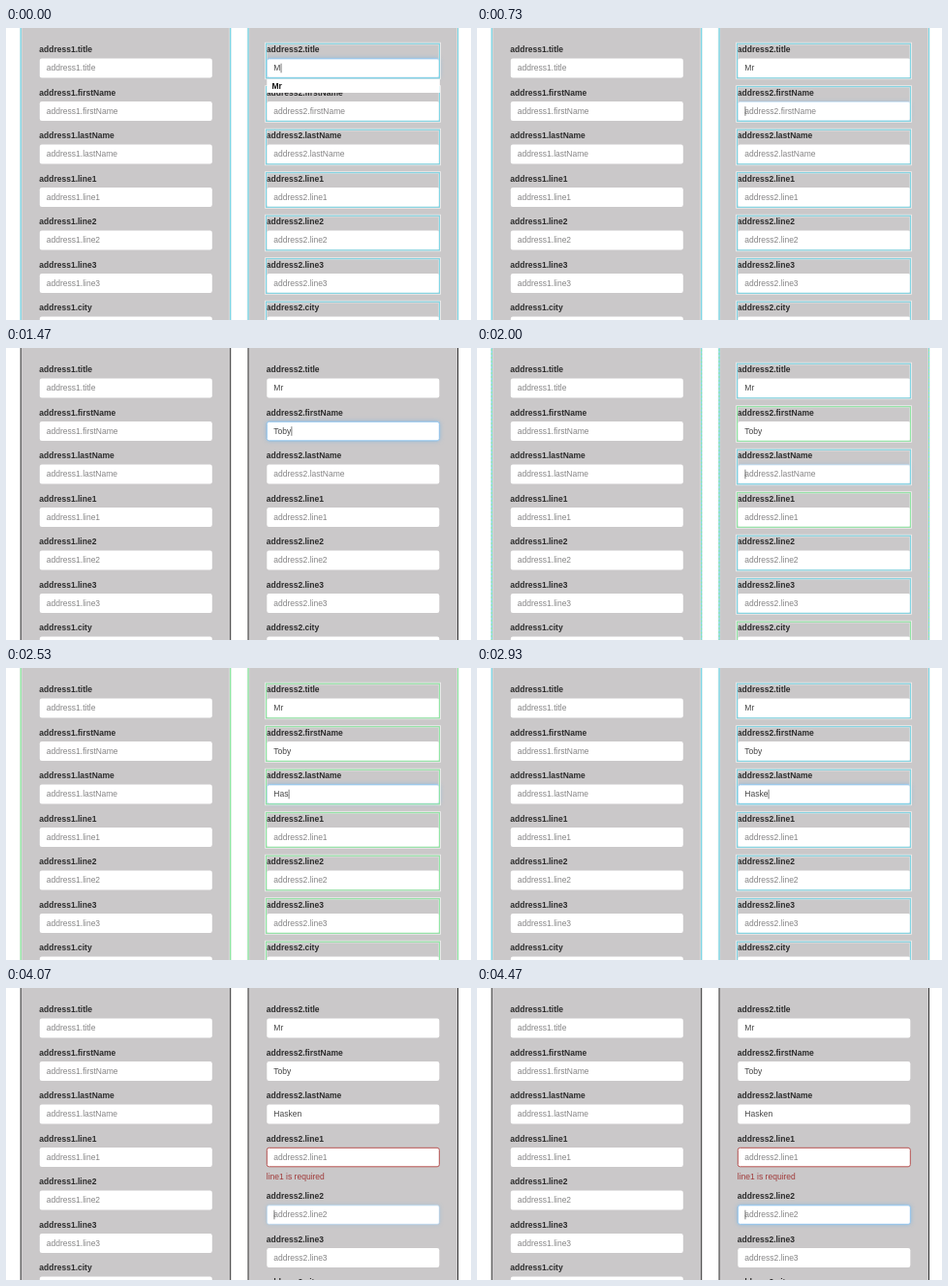
An HTML page for the animation above (4.54 s loop, 480 by 302 pixels).

```html
<!DOCTYPE html>
<html lang="en">
<head>
<meta charset="utf-8">
<title>Address form</title>
<style>
  html, body { margin: 0; width: 100%; height: 100%; overflow: hidden; background: #fff; }
  svg { display: block; width: 100%; height: 100%; }
  text { font: 8.5px "Liberation Sans", Arial, sans-serif; fill: #444; white-space: pre; }
  .label { font-weight: bold; fill: #2b2b2b; }
  .hint { fill: #858485; }
  .error { fill: #a03a3a; }
  .ring { fill: #fff; stroke: #7db9ea; stroke-width: .8; filter: drop-shadow(0 0 2px rgba(102, 175, 233, .6)); }
</style>
</head>
<body>
<svg id="stage" viewBox="0 0 480 302" preserveAspectRatio="none"></svg>
<script>
const LOOP = 4540, FPS = 15;
const NAMES = ['title', 'firstName', 'lastName', 'line1', 'line2', 'line3', 'city'];
const PITCH = 44.5, ERROR_SHIFT = 15, ERROR_TICK = 60, MENU_END = 7;
const PANELS = [15.2, 250];
const CYAN = '#78d6e6', GREEN = '#8be8a0', LIGHT = '#f0f0f0';

// All times below are ticks of 1/15 s.
const TYPED = {
  0: { text: 'Mr', at: [0, 2] },
  1: { text: 'Toby', at: [16, 17, 20, 21] },
  2: { text: 'Hasken', at: [34, 36, 38, 42, 44, 50] }
};
const FOCUS = [[-2, 0], [10, 1], [29, 2], [55, 3], [60, 4]];
const FLASH = [
  [0, 'cyan'], [3, 'green'], [4, 'cyan'], [5, ''],
  [7, 'cyan'], [10, ''], [11, 'cyan'], [14, ''],
  [16, 'cyan'], [18, 'green'], [22, ''],
  [28, 'cyan'], [30, 'mixed'], [31, 'green'], [32, ''],
  [34, 'cyan'], [36, 'green'], [41, ''],
  [42, 'cyan'], [45, 'green'], [49, ''],
  [50, 'cyan'], [54, ''], [55, 'cyan'], [59, ''],
  [62, 'cyan'], [64, 'green'], [67, '']
];
const MIXED_GREEN = [1, 3, 6];

const stage = document.getElementById('stage');
const pen = document.createElement('canvas').getContext('2d');
pen.font = '8.5px "Liberation Sans", Arial, sans-serif';

const latest = (list, tick) => list.filter(e => e[0] <= tick).pop();
const rect = (x, y, w, h, attrs) =>
  `<rect x="${x}" y="${y}" width="${w}" height="${h}" ${attrs}/>`;
const text = (x, y, cls, s) => `<text x="${x}" y="${y}" class="${cls}">${s}</text>`;

function valueAt(i, tick) {
  const typed = TYPED[i];
  return typed ? typed.text.slice(0, typed.at.filter(t => t <= tick).length) : '';
}

function panel(x, border) {
  return rect(x, -10, 216.5, 400, `fill="#cac8c9" stroke="${border}"`);
}

function field(x, y, name, value, ring, failed) {
  const top = y + 31.5;
  let out = text(x, y + 25, 'label', name) +
    rect(x + .5, top, 178, 20, 'rx="2.2" fill="#fff"');
  if (ring > 0) out += rect(x + .5, top + .3, 178, 19.5, `rx="2.2" class="ring" opacity="${ring}"`);
  if (failed) out += rect(x + .5, top + .3, 178, 19.5, 'rx="2.2" fill="none" stroke="#b5504f"');
  return out + text(x + 7.5, y + 44.4, value ? '' : 'hint', value || name);
}

function outline(x, y, w, h, color, dashed) {
  const line = (d, stroke, width, dash = '') =>
    rect(x - d, y - d, w + 2 * d, h + 2 * d,
      `fill="none" stroke="${stroke}" stroke-width="${width}" stroke-dasharray="${dash}"`);
  return line(1, LIGHT, .8) + line(-.9, LIGHT, .4) + line(0, color, 1) +
    (dashed ? line(0, GREEN, 1, '2 2') : '');
}

function draw(tick) {
  const [since, active] = latest(FOCUS, tick);
  const flash = latest(FLASH, tick)[1];
  const base = flash === 'green' ? GREEN : CYAN, mixed = flash === 'mixed';
  const failed = tick >= ERROR_TICK;
  const rowY = i => i * PITCH + (failed && i > 3 ? ERROR_SHIFT : 0);
  let out = PANELS.map(x => panel(x, flash ? base : '#333')).join('');

  NAMES.forEach((name, i) => {
    const value = valueAt(i, tick), y = rowY(i), bad = failed && i === 3;
    const ring = i === active ? Math.min(1, (tick - since) / 2) : 0;
    out += field(34.3, i * PITCH, 'address1.' + name, '', 0, false);
    out += field(268.8, y, 'address2.' + name, value, ring, bad);
    if (bad) out += text(268.8, y + 64, 'error', 'line1 is required');
    if (i === active) {
      const x = 276.6 + pen.measureText(value).width;
      out += rect(x, y + 36.7, .7, 9.6, 'fill="#444"');
    }
  });

  if (flash) {
    PANELS.forEach(x => { out += outline(x, -10, 216.5, 400, base, mixed); });
    NAMES.forEach((_, i) => {
      const color = mixed && MIXED_GREEN.includes(i) ? GREEN : base;
      const extra = failed && i === 3 ? ERROR_SHIFT : 0;
      out += outline(268.6, rowY(i) + 16.2, 178.8, 35.6 + extra, color, false);
    });
  }

  if (tick < MENU_END) {
    out += rect(269.3, 53, 178.5, 14, 'fill="#fff"') +
      '<text x="274.5" y="63.3" class="label" style="fill:#111">Mr</text>';
  }
  stage.innerHTML = out;
}

let shown = -1;
function frame(now) {
  const tick = Math.floor((now % LOOP + 5) * FPS / 1000);
  if (tick !== shown) draw(shown = tick);
  requestAnimationFrame(frame);
}
draw(0);
requestAnimationFrame(frame);
</script>
</body>
</html>
```
